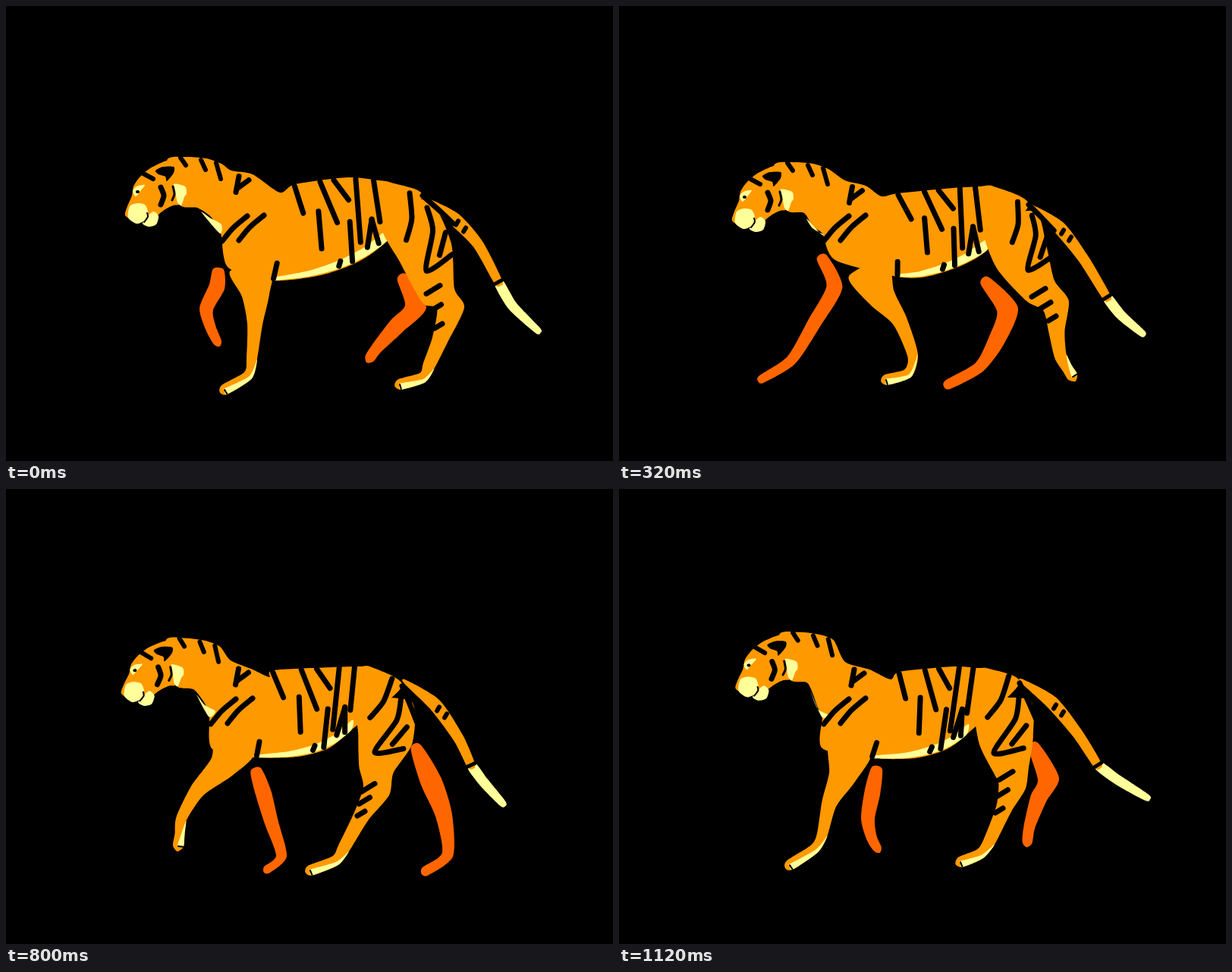
Recreate the animation shown at these times as an HTML page with a canvas. Size 800x600 px, loop 1.28 s.

```html
<!DOCTYPE html>
<html lang="en">
<head>
<meta charset="utf-8">
<title>Walking tiger</title>
<style>
html, body { margin: 0; width: 100%; height: 100%; overflow: hidden; background: #000; }
canvas { display: block; }
</style>
</head>
<body>
<canvas id="stage" width="800" height="600"></canvas>
<script>
const ctx = document.getElementById('stage').getContext('2d');
const ORANGE = '#f90', SHADE = '#f60', CREAM = '#ff9', BLACK = '#000';
const STEP = 160;

// Skeleton poses as x, y pairs. Legs and tail are joint chains; head is chin x, y and tilt.
// hock: lower corner of the thigh mark, then both ends of the row of short bands.
const strideEnd = {
  head: [190, 290, 0],
  back: [297, 217, 325, 222, 361, 246, 381, 235, 450, 226, 492, 230, 508, 233, 549, 250],
  belly: [352, 362, 415, 355, 465, 337, 503, 309],
  chest: [293, 345, 283, 300, 270, 278],
  front: [323, 345, 329, 382, 328, 420, 324, 465, 319, 487, 288, 506],
  hind: [525, 270, 553, 325, 570, 382, 586, 398, 572, 440, 557, 475, 549, 490, 519, 499],
  farFront: [280, 347, 278, 370, 264, 400, 270, 425, 279, 444],
  farHind: [522, 357, 540, 396, 515, 422, 488, 452, 479, 465],
  tail: [553, 255, 590, 280, 622, 314, 649, 364, 668, 396, 701, 428],
  hock: [554, 349, 563, 374, 570, 422]
};
const passing = {
  head: [185, 283, 5],
  back: [296, 226, 318, 236, 343, 243, 364, 238, 408, 232, 470, 235, 491, 239, 527, 254],
  belly: [347, 356, 395, 351, 440, 336, 473, 308],
  chest: [291, 342, 279, 300, 263, 288],
  front: [323, 345, 332, 382, 348, 425, 358, 465, 356, 488, 331, 504],
  hind: [505, 275, 522, 330, 548, 376, 571, 396, 576, 435, 578, 468, 571, 488, 547, 504],
  farFront: [280, 350, 281, 367, 247, 396, 237, 430, 231, 462],
  farHind: [470, 337, 490, 390, 462, 430, 430, 480, 402, 499],
  tail: [530, 258, 568, 290, 596, 322, 618, 372, 634, 390, 659, 419],
  hock: [521, 350, 545, 370, 568, 411]
};
const farReach = {
  head: [182, 297, 0],
  back: [298, 230, 325, 237, 346, 251, 368, 247, 440, 240, 476, 238, 494, 238, 540, 262],
  belly: [367, 357, 405, 357, 450, 343, 485, 322],
  chest: [285, 335, 268, 300, 255, 291],
  front: [328, 345, 347, 385, 370, 415, 387, 460, 381, 484, 352, 493],
  hind: [515, 280, 530, 330, 555, 375, 576, 395, 577, 430, 582, 462, 591, 478, 598, 489],
  farFront: [267, 331, 284, 370, 258, 417, 227, 467, 188, 492],
  farHind: [482, 362, 512, 400, 498, 440, 475, 476, 434, 499],
  tail: [543, 264, 580, 292, 612, 333, 643, 384, 662, 408, 690, 432],
  hock: [539, 348, 553, 378, 571, 412]
};
const pawLift = {
  head: [190, 271, -2],
  back: [289, 212, 330, 219, 364, 240, 368, 230, 440, 216, 472, 228, 490, 229, 548, 253],
  belly: [367, 349, 400, 339, 440, 324, 484, 297],
  chest: [303, 350, 281, 298, 273, 278],
  front: [334, 335, 320, 375, 288, 400, 274, 428, 278, 440, 283, 452],
  hind: [520, 280, 533, 320, 548, 356, 554, 370, 526, 402, 500, 435, 498, 450, 503, 462],
  farFront: [340, 390, 340, 412, 338, 450, 330, 475, 306, 490],
  farHind: [578, 378, 577, 405, 573, 440, 564, 467, 535, 476],
  tail: [551, 251, 584, 272, 612, 314, 632, 352, 648, 378, 677, 404],
  hock: [530, 333, 541, 350, 532, 379]
};
const hindReach = {
  head: [184, 285, 3],
  back: [296, 226, 325, 238, 347, 248, 352, 239, 430, 235, 466, 234, 482, 235, 522, 260],
  belly: [330, 354, 385, 353, 425, 342, 455, 318],
  chest: [272, 343, 268, 300, 262, 283],
  front: [302, 335, 285, 366, 252, 398, 231, 435, 229, 455, 227, 471],
  hind: [500, 280, 500, 330, 488, 370, 488, 398, 468, 432, 445, 474, 434, 490, 401, 503],
  farFront: [329, 370, 339, 400, 350, 440, 363, 484, 344, 502],
  farHind: [540, 340, 560, 385, 577, 430, 582, 482, 553, 504],
  tail: [526, 254, 565, 284, 596, 328, 613, 364, 630, 387, 655, 415],
  hock: [486, 347, 477, 394, 468, 428]
};
const planted = {
  head: [186, 278, 2],
  back: [298, 228, 330, 238, 358, 251, 370, 241, 440, 234, 473, 236, 488, 237, 528, 256],
  belly: [333, 355, 390, 355, 430, 344, 458, 324],
  chest: [268, 342, 268, 300, 262, 288],
  front: [305, 340, 294, 380, 277, 415, 268, 455, 258, 474, 225, 496],
  hind: [507, 280, 510, 330, 517, 372, 518, 392, 507, 422, 488, 465, 476, 481, 450, 492],
  farFront: [340, 368, 334, 400, 328, 435, 333, 460, 341, 475],
  farHind: [546, 338, 566, 382, 553, 408, 541, 445, 538, 466],
  tail: [531, 253, 570, 281, 604, 322, 631, 364, 658, 384, 696, 407],
  hock: [494, 348, 510, 378, 501, 424]
};

const mean = (a, b) => a.map((v, i) => (v + b[i]) / 2);
function between(a, b, tail) {
  const pose = {};
  for (const part in a) pose[part] = mean(a[part], b[part]);
  return { ...pose, tail };
}

const cycle = [
  strideEnd, passing, farReach,
  between(farReach, pawLift, mean(strideEnd.tail, farReach.tail)),
  pawLift, hindReach,
  between(hindReach, planted, planted.tail),
  planted
];

const pairs = flat => flat.flatMap((v, i) => i % 2 ? [] : [[v, flat[i + 1]]]);
const mix = (a, b, t) => [a[0] + (b[0] - a[0]) * t, a[1] + (b[1] - a[1]) * t];
const shift = ([x, y], dx, dy) => [x + dx, y + dy];

// Point at fraction t of a polyline.
function along(points, t) {
  const s = t * (points.length - 1), i = Math.min(Math.floor(s), points.length - 2);
  return mix(points[i], points[i + 1], s - i);
}

// Smooth curve through the points.
function trace(points, closed) {
  const n = points.length;
  const at = i => points[closed ? (i + n) % n : Math.max(0, Math.min(n - 1, i))];
  ctx.beginPath();
  ctx.moveTo(...points[0]);
  for (let i = 0; i < n - !closed; i++) {
    const p = at(i - 1), a = at(i), b = at(i + 1), q = at(i + 2);
    ctx.bezierCurveTo(a[0] + (b[0] - p[0]) / 8, a[1] + (b[1] - p[1]) / 8,
      b[0] - (q[0] - a[0]) / 8, b[1] - (q[1] - a[1]) / 8, ...b);
  }
}

function fill(points, color) {
  trace(points, true);
  ctx.fillStyle = color;
  ctx.fill();
}

function stroke(points, width = 7) {
  trace(points, false);
  ctx.strokeStyle = BLACK;
  ctx.lineWidth = width;
  ctx.lineCap = ctx.lineJoin = 'round';
  ctx.stroke();
}

// Tapered shape around a joint chain; returns a function giving its edge points.
function limb(joints, widths, color) {
  const edge = (i, side) => {
    const [x0, y0] = joints[Math.max(0, i - 1)];
    const [x1, y1] = joints[Math.min(joints.length - 1, i + 1)];
    const k = side * widths[i] / 2 / Math.hypot(x1 - x0, y1 - y0);
    return shift(joints[i], (y1 - y0) * k, (x0 - x1) * k);
  };
  const rear = joints.map((_, i) => edge(i, 1));
  const fore = joints.map((_, i) => edge(i, -1));
  const last = joints.length - 1, [a, b] = joints.slice(-2);
  const tip = mix(a, b, 1 + widths[last] / 2 / Math.hypot(b[0] - a[0], b[1] - a[1]));
  fill([...rear, tip, ...fore.reverse()], color);
  return edge;
}

function nearLeg(flat, widths) {
  const joints = pairs(flat), edge = limb(joints, widths, ORANGE);
  const n = joints.length;
  const low = [n - 3, n - 2, n - 1];
  fill([...low.map(i => edge(i, 1)), joints[n - 1],
    edge(n - 1, -0.2), edge(n - 2, 0.3)], CREAM);
  stroke([edge(n - 1, 0.9), edge(n - 1, 0)], 2);
}

function drawTail(flat) {
  const joints = pairs(flat);
  limb(joints.slice(3), [12, 13, 9], CREAM);
  const edge = limb(joints.slice(0, 4), [5, 17, 14, 11], ORANGE);
  stroke([edge(3, 1), edge(3, -1)], 5);
  for (const d of [5, 15]) {
    const spot = shift(joints[1], d, d * 0.9);
    stroke([shift(spot, -2, 4), shift(spot, 1, -1)], 6);
  }
}

function drawHead() {
  const shape = (color, ...flat) => fill(pairs(flat), color);
  const line = (width, ...flat) => stroke(pairs(flat), width);
  shape(ORANGE, 157, 276, 160, 264, 166, 250, 168, 238, 176, 226, 190, 214, 212, 204, 230, 206,
    238, 235, 231, 260, 220, 263, 210, 268, 200, 276, 196, 284, 168, 282);
  shape(CREAM, 163, 264, 173, 260, 183, 262, 187, 272, 182, 283, 172, 287, 161, 279);
  shape(CREAM, 184, 280, 194, 271, 201, 277, 198, 288, 188, 291, 180, 287);
  shape(CREAM, 167, 244, 172, 238, 183, 236, 178, 243, 171, 251);
  shape(CREAM, 221, 235, 236, 238, 238, 247, 235, 252, 231, 263, 226, 259, 224, 250);
  shape(BLACK, 197, 217, 207, 212, 221, 212, 221, 220, 212, 231, 210, 225, 201, 222);
  line(4, 173, 245, 174, 245);
  line(2, 182, 285, 187, 278, 186, 273);
  line(6, 181, 221, 194, 228);
  line(7, 204, 239, 208, 250, 204, 262);
  line(3, 220, 238, 222, 248, 219, 256);
  line(6, 230, 200, 237, 210);
  line(6, 257, 203, 263, 216);
  line(6, 277, 207, 283, 228);
}

// Flank stripes: position along the back and depth towards the belly, for both ends.
const FLANK = [
  [0, 0.02, 0.13, 0.32], [0.26, 0.32, 0.32, 0.72], [0.24, 0.01, 0.44, 0.48],
  [0.37, 0.01, 0.54, 0.25], [0.63, 0.01, 0.69, 0.78], [0.57, 0.5, 0.61, 0.97],
  [0.91, 0.01, 0.94, 0.65], [0.84, 0.56, 0.77, 0.9], [0.84, 0.56, 0.9, 0.95],
  [0.5, 0.92, 0.49, 0.97], [0, 0.82, 0, 0.98]
];

// Thigh marks relative to the tail root.
const THIGH = [
  [-16, -5, -17, 28, -27, 54], [0, 0, 18, 20, 35, 40],
  [4, 16, 8, 46, -6, 96, 29, 79], [24, 50, 13, 78]
];

function draw(pose) {
  ctx.fillStyle = BLACK;
  ctx.fillRect(0, 0, 800, 600);
  const [chinX, chinY, tilt] = pose.head;
  const headFrame = new DOMMatrix().translate(chinX, chinY).rotate(tilt).translate(-190, -290);
  const onHead = ([x, y]) => {
    const p = headFrame.transformPoint({ x, y });
    return [p.x, p.y];
  };
  const back = pairs(pose.back), belly = pairs(pose.belly), chest = pairs(pose.chest);
  const spine = back.slice(3, 6), root = back[7];
  const flank = (u, v) => mix(along(spine, u), along(belly, u), v);

  limb(pairs(pose.farFront), [14, 21, 18, 14, 11], SHADE);
  limb(pairs(pose.farHind), [14, 28, 22, 15, 13], SHADE);
  drawTail(pose.tail);

  const nape = pairs([212, 204, 238, 199, 264, 201, 284, 208]).map(onHead);
  const throat = pairs([252, 266, 228, 261]).map(onHead);
  fill([...nape, ...back, ...[...belly].reverse(), ...chest, ...throat], ORANGE);
  fill([chest[2], mix(chest[2], throat[0], 0.7), mix(chest[2], chest[1], 0.9),
    shift(chest[2], 14, 8)].map(p => shift(p, 0, 2)), CREAM);
  const rim = [0, 0.25, 0.5, 0.75, 1];
  fill([...rim.map(u => flank(u, 1)), ...rim.reverse().map(u => flank(u, 0.97 - 0.13 * u))], CREAM);
  nearLeg(pose.front, [56, 36, 20, 14, 13, 14]);
  nearLeg(pose.hind, [68, 72, 46, 36, 21, 16, 14, 14]);

  for (const [u0, v0, u1, v1] of FLANK) stroke([flank(u0, v0), flank(u1, v1)]);

  const blade = shift(mix(back[0], back[1], 0.5), -4, 17);
  stroke([shift(blade, 0, -12), shift(blade, -4, 9)]);
  stroke([shift(blade, 13, -7), shift(blade, -2, 4)]);
  for (const [x, y] of [[18, -7], [40, -8]]) {
    const middle = shift(chest[1], x, y);
    stroke([shift(middle, 17, -16), shift(middle, -2, 0), shift(middle, -16, 17)]);
  }

  const [cornerX, cornerY, ...bands] = pose.hock;
  const dx = cornerX - root[0], dy = cornerY - root[1];
  const turn = Math.atan2(dy, dx) - Math.atan2(96, -6), scale = Math.hypot(dx, dy) / 96;
  const c = Math.cos(turn) * scale, s = Math.sin(turn) * scale;
  for (const mark of THIGH) {
    stroke(pairs(mark).map(([x, y]) => shift(root, x * c - y * s, x * s + y * c)));
  }
  for (const t of [0, 0.5, 1]) {
    const spot = along(pairs(bands), t), reach = 9 - 4 * t;
    stroke([shift(spot, reach, -reach * 0.6), shift(spot, -reach, reach * 0.6)]);
  }

  ctx.save();
  ctx.transform(headFrame.a, headFrame.b, headFrame.c, headFrame.d, headFrame.e, headFrame.f);
  drawHead();
  ctx.restore();
}

const start = performance.now();
function tick() {
  const step = Math.floor((performance.now() - start) / STEP);
  draw(cycle[step % cycle.length]);
  requestAnimationFrame(tick);
}
tick();
</script>
</body>
</html>
```
